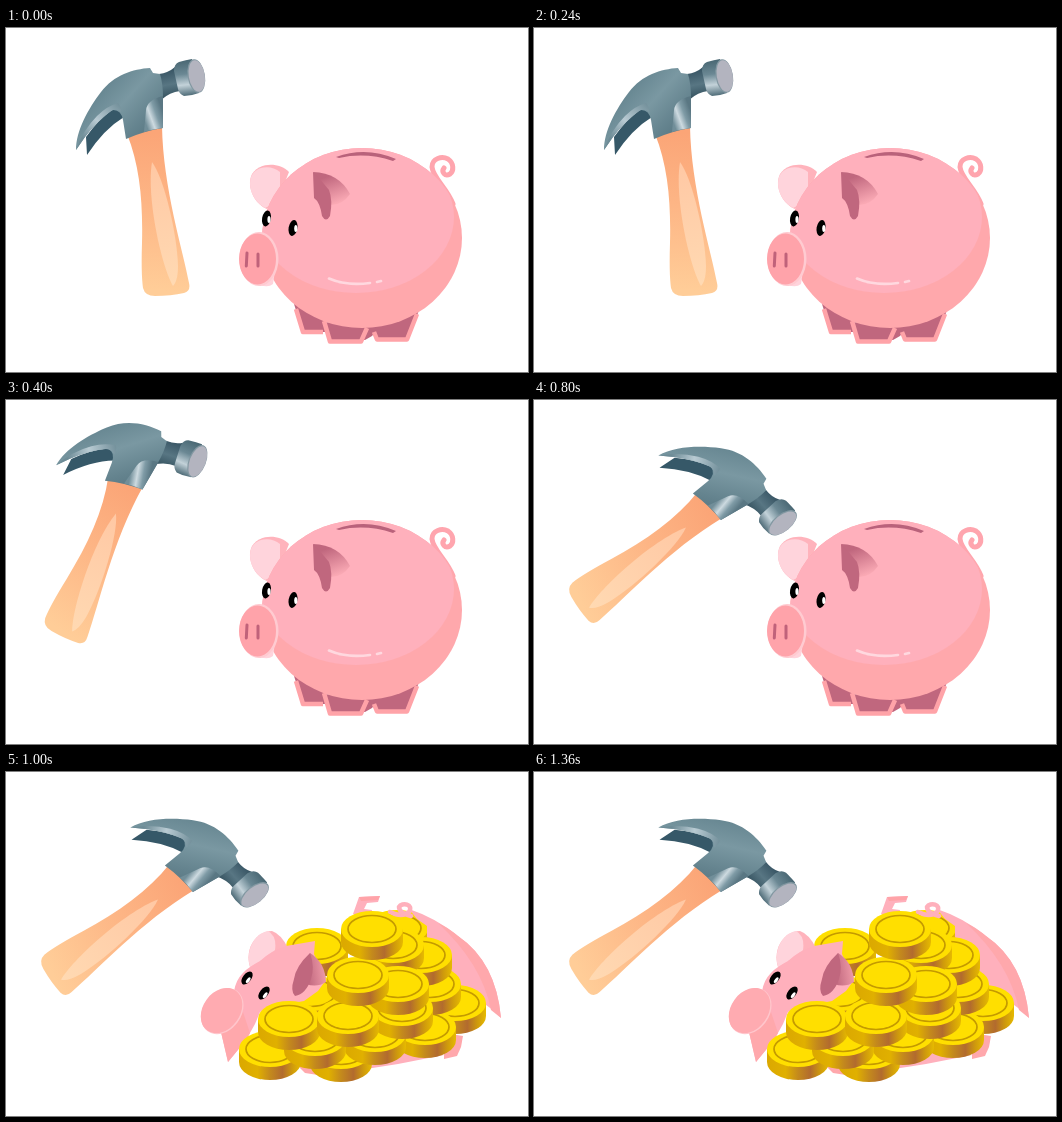
An HTML page for the animation above (1600 ms loop, 522 by 344 pixels).

```html
<!DOCTYPE html>
<html lang="en">
<head>
<meta charset="utf-8">
<title>Hammer and piggy bank</title>
<style>
  html, body { margin: 0; width: 100%; height: 100%; overflow: hidden; background: #fff; }
  svg { display: block; width: 100vw; height: 100vh; }
</style>
</head>
<body>
<svg viewBox="0 0 522 344" xmlns="http://www.w3.org/2000/svg">
  <defs>
    <linearGradient id="wood" gradientUnits="userSpaceOnUse" x1="155" y1="105" x2="145" y2="262">
      <stop offset="0" stop-color="#fba577"/><stop offset=".45" stop-color="#fdb585"/><stop offset="1" stop-color="#ffcd98"/>
    </linearGradient>
    <linearGradient id="gloss" gradientUnits="userSpaceOnUse" x1="148" y1="135" x2="165" y2="255">
      <stop offset="0" stop-color="#ffc8a4"/><stop offset="1" stop-color="#ffd9b2"/>
    </linearGradient>
    <linearGradient id="steel" gradientUnits="userSpaceOnUse" x1="95" y1="55" x2="150" y2="105">
      <stop offset="0" stop-color="#64848f"/><stop offset=".4" stop-color="#7a98a2"/>
      <stop offset=".75" stop-color="#64838e"/><stop offset="1" stop-color="#587681"/>
    </linearGradient>
    <linearGradient id="cheek" gradientUnits="userSpaceOnUse" x1="138" y1="91" x2="157" y2="84">
      <stop offset="0" stop-color="#718e99"/><stop offset=".35" stop-color="#cddae0"/>
      <stop offset=".65" stop-color="#7f9ba6"/><stop offset="1" stop-color="#5a7783"/>
    </linearGradient>
    <linearGradient id="claw" gradientUnits="userSpaceOnUse" x1="78" y1="112" x2="114" y2="76">
      <stop offset="0" stop-color="#6d8b96"/><stop offset=".45" stop-color="#b9cbd3"/><stop offset="1" stop-color="#728f9a"/>
    </linearGradient>
    <linearGradient id="neck" gradientUnits="userSpaceOnUse" x1="160" y1="43" x2="165" y2="68">
      <stop offset="0" stop-color="#3a5766"/><stop offset=".55" stop-color="#587683"/><stop offset="1" stop-color="#395663"/>
    </linearGradient>
    <linearGradient id="poll" gradientUnits="userSpaceOnUse" x1="174" y1="32" x2="178" y2="68">
      <stop offset="0" stop-color="#486672"/><stop offset=".4" stop-color="#6b8894"/>
      <stop offset=".7" stop-color="#c3d2d9"/><stop offset="1" stop-color="#506d79"/>
    </linearGradient>
    <linearGradient id="flap" gradientUnits="userSpaceOnUse" x1="320" y1="149" x2="331" y2="178">
      <stop offset="0" stop-color="#c0677e"/><stop offset="1" stop-color="#ffafb9"/>
    </linearGradient>
    <linearGradient id="flap2" gradientUnits="userSpaceOnUse" x1="300" y1="200" x2="322" y2="197">
      <stop offset="0" stop-color="#c0677e"/><stop offset="1" stop-color="#f5a2ae"/>
    </linearGradient>
    <linearGradient id="rim">
      <stop offset="0" stop-color="#dba800"/><stop offset=".3" stop-color="#e0b000"/><stop offset=".5" stop-color="#c48a1c"/>
      <stop offset=".7" stop-color="#b26b2e"/><stop offset=".86" stop-color="#cf9a0c"/><stop offset="1" stop-color="#e6ba00"/>
    </linearGradient>
    <clipPath id="belly"><ellipse cx="356" cy="210" rx="100" ry="90"/></clipPath>
  </defs>

  <g id="pig">
    <path d="M447 176C441 160 427 150 426 139C426 130 436 128 442 131C448 135 448 143 444 146C439 149 435 144 438 140" fill="none" stroke="#ffa5ae" stroke-width="5" stroke-linecap="round"/>
    <path d="M283 144C273 134 254 134 246 146C240 158 248 176 261 181L275 164Z" fill="#ffb3bc"/>
    <path d="M274 144C265 136 249 138 245 149C241 161 249 175 259 180Q274 174 274 158Z" fill="#ffd4dc"/>
    <g fill="#c0677e" stroke="#ffa3a8" stroke-linejoin="round">
      <path d="M288 276L319 285V304H297ZM318 294L376 296L366 308L359 312H323ZM367 297L413 282L403 310H369Z" stroke="none"/>
      <path d="M290 281L297 304H317" fill="none" stroke-width="4.500"/>
      <path d="M318 293L324 313.500H355L361 300" fill="none" stroke-width="4.500"/>
      <path d="M368 304L371 311.500H401L411 286" fill="none" stroke-width="4.500"/>
    </g>
    <g clip-path="url(#belly)">
      <rect x="255" y="118" width="204" height="184" fill="#ffa8ac"/>
      <ellipse cx="350" cy="189" rx="98" ry="76" fill="#ffb0bc"/>
    </g>
    <path d="M330 129Q360 118 390 131L387 133Q360 124 333 130Z" fill="#b9627b"/>
    <path d="M307 144Q333 145 344 166Q336 178 323 177Z" fill="url(#flap)"/>
    <path d="M307 144L308 170Q314 174 316 188Q320 195 324 188Q327 172 323 162Q316 153 307 144Z" fill="#c0677e"/>
    <ellipse cx="260.500" cy="190.500" rx="4.400" ry="8" transform="rotate(10 260.500 190.500)"/>
    <ellipse cx="263" cy="191.500" rx="1.600" ry="3.500" fill="#fff"/>
    <ellipse cx="287" cy="200" rx="4.400" ry="8" transform="rotate(10 287 200)"/>
    <ellipse cx="289.800" cy="200.500" rx="1.600" ry="3.500" fill="#fff"/>
    <path d="M250 255Q261 261 267 256L269 243Z" fill="#ffd4dc"/>
    <ellipse cx="253" cy="231" rx="19.500" ry="27" fill="#ffcbd1"/>
    <ellipse cx="251.500" cy="231" rx="18.500" ry="25.500" fill="#ffa3aa"/>
    <path d="M241 225L240.300 238M252 226V238" stroke="#c0627a" stroke-width="3" stroke-linecap="round"/>
    <path d="M323 250.500Q340 258 364 255M371 254L375 253" fill="none" stroke="#ffd8df" stroke-width="2.600" stroke-linecap="round"/>
  </g>

  <g id="broken">
    <path d="M347 142L353 125L374 124L372 130L361 131L358 137L366 138L364 148Z" fill="#ffb0bc"/>
    <path d="M353 125L374 124L372 128L355 129Z" fill="#ffa3a8"/>
    <path d="M438 261L457 264L455 275L451 284L438 287Z" fill="#ffa8ac"/>
    <path d="M340 284L400 270L438 283L392 292L360 297Z" fill="#ffb0bc"/>
    <path d="M289 291L309 289L312 303L299 301Z" fill="#ffa8ac"/>
    <g id="back"></g>
    <path d="M403 137Q430 146 452 164Q490 190 495 246Q487 237 474 229L440 225L421 165V154L411 147Z" fill="#ffb0bc"/>
    <path d="M432 151Q444 157 452 164Q490 190 495 246L485 238Q476 192 432 151Z" fill="#ffa8ac"/>
    <path d="M384 140Q396 146 403 140C408 132 396 130 393 135Q393 141 405 144" fill="none" stroke="#ffb0bc" stroke-width="4.500" stroke-linecap="round"/>
    <path d="M244 195C238 176 251 159 266 159Q275 162 282 176L274 184Z" fill="#ffb3bc"/>
    <path d="M244 195C239 178 249 161 262 159Q271 164 269 178Q260 189 244 195Z" fill="#ffd4dc"/>
    <path d="M228 219C231 204 239 197 254 189Q266 178 280 174L309 169L308 182L320 208L312 219L298 229L276 233L254 240L249 252L240 268L222 290L215 260Z" fill="#ffb0bc"/>
    <path d="M237 240L244 261L240 268L222 290L215 260Z" fill="#ffa8ac"/>
    <path d="M304 181Q319 190 320 210Q311 216 300 212Z" fill="url(#flap2)"/>
    <path d="M304 181Q290 194 288 207Q284 219 289 224Q300 222 305 207Q309 195 304 181Z" fill="#c0677e"/>
    <g transform="translate(241 206) rotate(38)"><ellipse rx="4.200" ry="7.500"/><ellipse cx="2.300" cy="1" rx="1.500" ry="3.300" fill="#fff"/></g>
    <g transform="translate(258 221) rotate(38)"><ellipse rx="4.200" ry="7.500"/><ellipse cx="2.300" cy="1" rx="1.500" ry="3.300" fill="#fff"/></g>
    <g transform="translate(215.500 238.500) rotate(36)">
      <ellipse cx="1" rx="19" ry="25" fill="#ffc6cc"/><ellipse rx="18.500" ry="24.500" fill="#ffabb1"/>
    </g>
    <g id="front"></g>
  </g>

  <g id="hammer">
    <path d="M121 106C134 138 137 175 136 215Q135 246 137 260Q139 268 149 268Q165 268 178 265Q185 263 183 255C177 222 157 160 156 98Z" fill="url(#wood)"/>
    <path d="M146 134C158 150 171 205 172 238Q172 253 167 258C156 240 140 170 146 134Z" fill="url(#gloss)"/>
    <path d="M81 127L80 109Q92 92 106 82L115 80L118 89Q98 101 81 127Z" fill="#365868"/>
    <path d="M153 46Q162 45 169 39L174 63Q164 64 155 72Z" fill="url(#neck)"/>
    <path d="M168 43Q168 36 173 34Q180 32 186 31L193 65Q185 68 178 68Q173 66 172 61Z" fill="url(#poll)"/>
    <ellipse cx="190.300" cy="48" rx="8.700" ry="17" transform="rotate(-9 190.300 48)" fill="#8398a2"/>
    <ellipse cx="190.800" cy="48" rx="8" ry="16" transform="rotate(-9 190.800 48)" fill="#b3b4bf"/>
    <path d="M70 122C70 103 82 81 95 64C108 47 127 41 144 40L147 45L154 46Q157 56 157 69L157 100Q138 103 120 111L117 92Q115 81 106 82Q90 94 79 109Z" fill="url(#steel)"/>
    <path d="M70 122Q77 102 91 88Q101 78 112 75Q116 80 115 84Q111 80 105 83Q90 94 79 109Z" fill="url(#claw)"/>
    <path d="M138 104L140 82Q141 72 157 68V100Q147 101 138 104Z" fill="url(#cheek)"/>
  </g>
</svg>
<script>
  const $ = id => document.getElementById(id);

  // Each coin is given by the centre of its upper face.
  const coin = ([x, y]) => `<g transform="translate(${x} ${y})">
    <path d="M-31 0V13A31 18 0 0 0 31 13V0Z" fill="url(#rim)"/>
    <ellipse rx="31" ry="18" fill="#ffdf00"/>
    <ellipse rx="24" ry="13.500" fill="none" stroke="#c49a00" stroke-width="1.700"/></g>`;
  const pile = (id, list) => { $(id).innerHTML = list.map(coin).join(''); };

  pile('back', [[391, 156], [311, 174], [305, 221]]);
  pile('front', [
    [449, 231], [419, 255], [335, 279], [264, 277], [369, 262], [309, 266],
    [424, 212], [396, 236], [283, 247], [342, 244],
    [415, 183], [387, 173], [392, 212], [352, 203], [366, 157]
  ]);

  const LOOP = 1600, BREAK = 1000;
  const swing = [
    { at: 0, turn: 0, x: 0, y: 0 },
    { at: 400, turn: 30, x: 50.5, y: -75.5 },
    { at: 800, turn: 60, x: 195, y: -66 }
  ];

  function draw(t) {
    const pose = swing.filter(p => t >= p.at).pop();
    $('hammer').setAttribute('transform', `translate(${pose.x} ${pose.y}) rotate(${pose.turn})`);
    const smashed = t >= BREAK;
    $('pig').setAttribute('display', smashed ? 'none' : 'inline');
    $('broken').setAttribute('display', smashed ? 'inline' : 'none');
  }

  const start = performance.now();
  function tick() {
    draw((performance.now() - start) % LOOP);
    requestAnimationFrame(tick);
  }
  tick();
</script>
</body>
</html>
```
